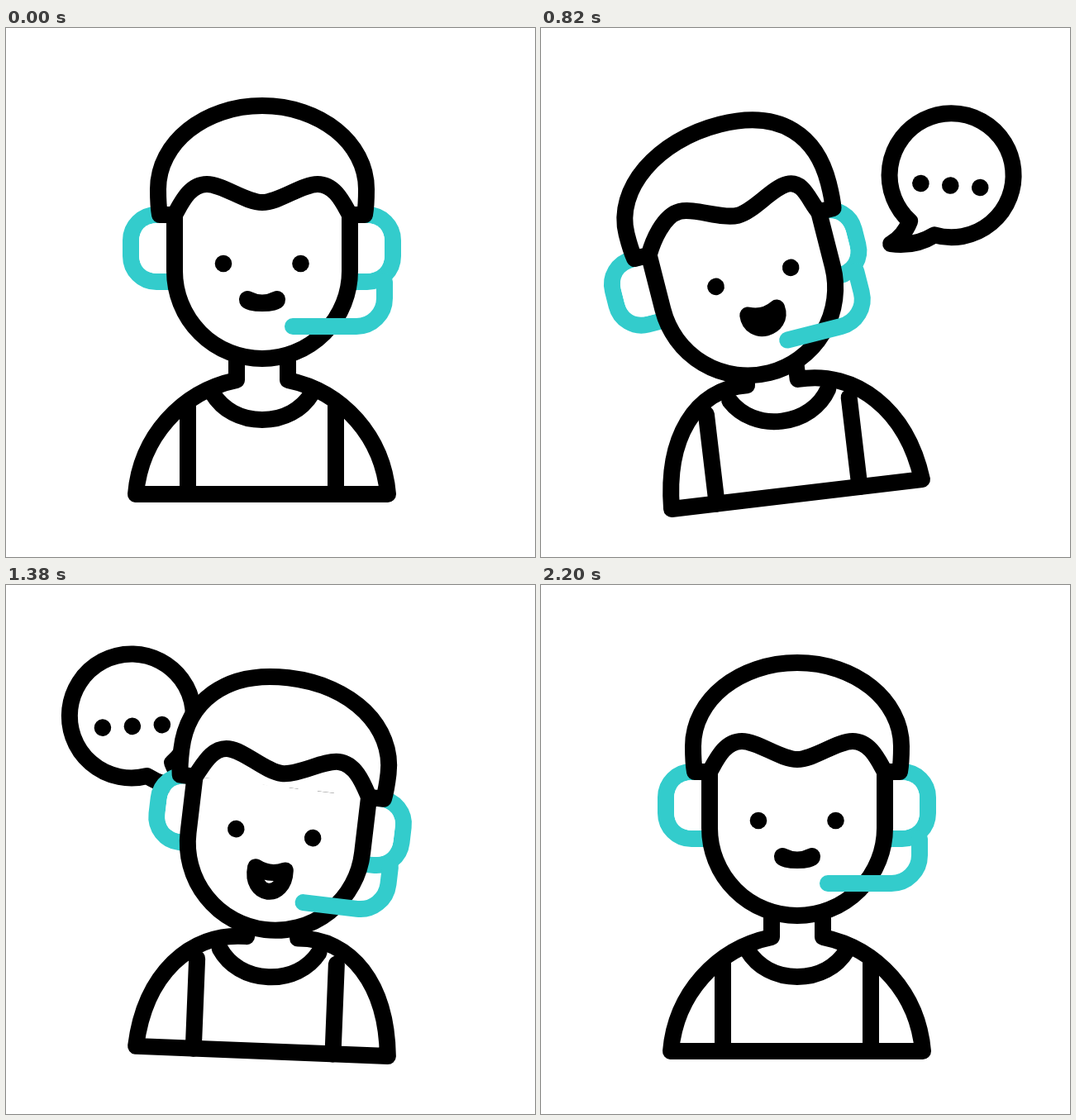
Write an HTML page with a canvas that moves like this. It is 640 px wide and 640 px high and loops after 2.4 s.

```html
<!DOCTYPE html>
<html lang="en">
<head>
<meta charset="utf-8">
<title>Support agent</title>
<style>
  html, body { margin: 0; height: 100%; overflow: hidden; background: #fff; }
  canvas { display: block; }
</style>
</head>
<body>
<canvas id="stage" width="640" height="640"></canvas>
<script>
const ctx = document.getElementById('stage').getContext('2d');
const LOOP = 2400, START = 200, END = 2200;
const BLACK = '#000', CYAN = '#33cccc';

// Both bubbles pop out, drift and return on one path: age, distance, height
const BUBBLE_PATH = [
  [0, 0, 250], [220, 124, 213], [300, 130, 172], [430, 150, 157],
  [620, 186, 178], [780, 207, 188], [880, 181, 195], [1020, 106, 215], [1200, 0, 240]
];
const BUBBLES = [
  { side: 1, start: 200, x: 310, tilt: 4, swing: 0 },
  { side: -1, start: 1000, x: 294, tilt: 2, swing: 9.5 }
];

function segment(times, t) {
  let i = 0;
  while (i < times.length - 2 && t > times[i + 1]) i++;
  const u = (t - times[i]) / (times[i + 1] - times[i]);
  return [i, Math.min(1, Math.max(0, u))];
}

// Eased pose change: rest, leaning left, leaning right, rest
function lean(leftTime, rightTime, t) {
  const [i, u] = segment([START, leftTime, rightTime, END], t);
  const eased = (1 - Math.cos(Math.PI * u)) / 2;
  return (left, right) => {
    const poses = [0, left, right, 0];
    return poses[i] + (poses[i + 1] - poses[i]) * eased;
  };
}

// Continuous motion through the keys
function spline(keys, column, t) {
  const [i, u] = segment(keys.map(k => k[0]), t);
  const slope = j => j <= 0 || j >= keys.length - 1 ? 0 :
    (keys[j + 1][column] - keys[j - 1][column]) / (keys[j + 1][0] - keys[j - 1][0]);
  const span = keys[i + 1][0] - keys[i][0], v = 1 - u;
  return v * v * ((1 + 2 * u) * keys[i][column] + u * span * slope(i)) +
         u * u * ((3 - 2 * u) * keys[i + 1][column] - v * span * slope(i + 1));
}

function fill(d) {
  ctx.fillStyle = '#fff';
  ctx.fill(new Path2D(d));
}

function line(d, color = BLACK) {
  ctx.strokeStyle = color;
  ctx.stroke(new Path2D(d));
}

function shape(d, color) {
  fill(d);
  line(d, color);
}

function dot(x, y) {
  ctx.beginPath();
  ctx.arc(x, y, 10.3, 0, 2 * Math.PI);
  ctx.fillStyle = BLACK;
  ctx.fill();
}

function group(x, y, degrees, draw) {
  ctx.save();
  ctx.translate(x, y);
  ctx.rotate(degrees * Math.PI / 180);
  draw();
  ctx.restore();
}

function drawBubble({ side, start, x, tilt, swing }, t) {
  const age = t - start;
  if (age <= 0 || age >= 1200) return;
  const angle = tilt + swing * Math.cos((age - 220) / 340 * Math.PI);
  group(x + side * spline(BUBBLE_PATH, 1, age), spline(BUBBLE_PATH, 2, age), side * angle, () => {
    ctx.scale(side, 1);
    shape('M-46 59 A75 75 0 1 1 -15 73.5 Q-38 90 -67 88 Q-52 78 -46 59 Z');
    [-36, 0, 36].forEach(dx => dot(dx, 12.5));
  });
}

function drawBody(tilt, pull) {
  const neck = pull(-14, 14), collar = pull(-8, 8), lift = pull(17, 17);
  const leftStrap = -90 + pull(-8, 12), rightStrap = 89 + pull(-13, 0);

  group(310, 564, tilt(-7, 7), () => {
    shape(`M${-31 + neck} -169 V-138
      C${-98 + neck * .7} ${-124 - lift} ${-147 + neck * .2} ${-69 - lift} -153 0 H152
      C${146 + neck * .2} ${-69 - lift} ${98 + neck * .7} ${-124 - lift} ${31 + neck} -138 V-169`);
    line(`M${leftStrap} -109 V0 M${rightStrap} -109 V0`);
    line(`M${-60 + collar} -122 C${-48 + collar} -102 ${-26 + collar} -90 ${collar} -90
      S${48 + collar} -102 ${60 + collar} -122`);
  });
}

function drawHead(move, t) {
  const turn = move(-1, 1), sway = move(1, 1);
  const face = move(10, -6.5), raise = 2 * sway;
  const leftEar = -159 + move(0, 17), rightEar = 158 + move(-16, -3);
  const micTip = 37 + move(-6, 9), micY = 67 + move(6, -1);
  const crown = -16 * turn, curl = 70 + 9 * sway, fringe = -5 * turn * turn;
  const talk = Math.max(0, Math.min(1, (t - START) / 250, (END - t) / 300));
  const jaw = 40.7 + 18 * talk + 13 * sway ** 2 * (1 - turn ** 2);

  group(310 + move(-60, 43), 294 + 17 * sway + 3.5 * turn ** 2, 14.3 * turn, () => {
    line(`M-106 -68 H${leftEar + 31} a31 31 0 0 0 -31 31 v19 a31 31 0 0 0 31 31 H-106`, CYAN);
    line(`M106 -68 H${rightEar - 31} a31 31 0 0 1 31 31 v19 a31 31 0 0 1 -31 31 H106`, CYAN);
    fill(`M${leftEar + 10} -35 q0 -23 23 -23 H${rightEar - 33} q23 0 23 23
      v15 q0 23 -23 23 H${leftEar + 33} q-23 0 -23 -23 Z`);

    const hair = `M-124 -68 C-126 -79 -126 -89 -126 -99
      C-126 -155 ${crown - curl} -200 ${crown} -200 S126 -155 126 -99
      C126 -89 126 -79 124 -68`;
    fill(hair);
    shape('M-106 -68 V0 A106 106 0 0 0 106 0 V-68');
    line(`${hair} H106
      C98 -82 ${88 + face} ${fringe - 105} ${67 + face} ${fringe - 105}
      C${48 + face} ${fringe - 105} ${20 + face} ${fringe - 83} ${face} ${fringe - 83}
      S${-48 + face} ${fringe - 105} ${-67 + face} ${fringe - 105}
      C${-88 + face} ${fringe - 105} -98 -82 -106 -68 Z`);

    group(face, -raise, 0, () => {
      dot(-47, -9);
      dot(46.5, -9);
      shape(`M-18 34 Q0 43 18 34 C21 ${jaw + raise} -21 ${jaw + raise} -18 34 Z`);
    });

    line(`M${rightEar - 10} 13 V${micY - 34} a34 34 0 0 1 -34 34 H${micTip}`, CYAN);
  });
}

function render(now) {
  const t = now % LOOP;
  const bodyLean = lean(905, 1690, t), headLean = lean(840, 1664, t);
  ctx.fillStyle = '#fff';
  ctx.fillRect(0, 0, 640, 640);
  ctx.lineWidth = 20;
  ctx.lineCap = ctx.lineJoin = 'round';
  BUBBLES.forEach(bubble => drawBubble(bubble, t));
  drawBody(bodyLean, headLean);
  drawHead(headLean, t);
}

const start = performance.now();
function tick() {
  render(performance.now() - start);
  requestAnimationFrame(tick);
}
tick();
</script>
</body>
</html>
```
